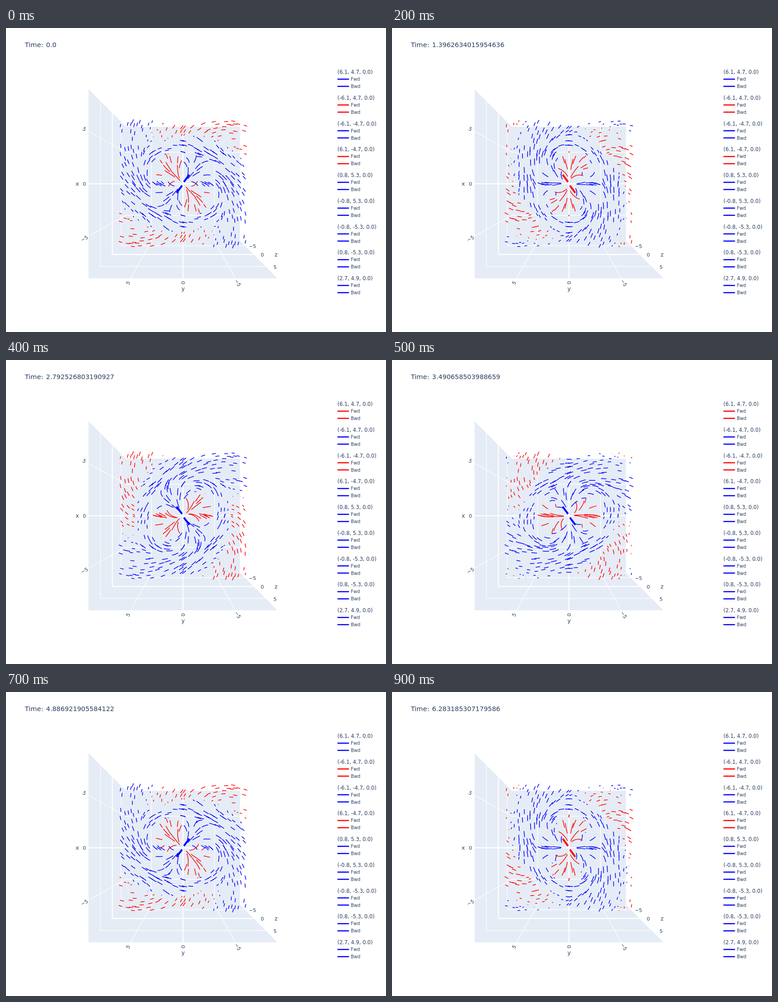
An HTML page with a canvas for the animation above (1000 ms loop, 837 by 669 pixels).

```html
<!DOCTYPE html>
<html lang="en">
<head>
<meta charset="utf-8">
<style>
  html, body { margin: 0; width: 100%; height: 100%; overflow: hidden; background: #fff; }
  canvas { display: block; }
</style>
</head>
<body>
<canvas id="stage" width="837" height="669"></canvas>
<script>
const ctx = document.getElementById('stage').getContext('2d');
const CX = 389.8, CY = 342.8, UNIT = 17.24;
const BLUE = '#0000ff', RED = '#ff0000', INK = '#2a3f5f', WALL = '#e5ecf6';
const STEPS = 10, HOLD = 100;
const WAVE = 0.6 / UNIT;                 // radial wave number per pixel
const AXIS = 133 * Math.PI / 180;        // starting direction of the inner pattern
const TURN = 25.1 * Math.PI / 180;       // rotation per step
const SIGNS = [[1, 1], [-1, 1], [-1, -1], [1, -1]];

// Seed points of one quadrant; x points up and y to the left.
const named = [[6.1, 4.7], [0.8, 5.3], [2.7, 4.9]];
const seeds = [...named];
let state = 11;
const random = () => (state = state * 16807 % 2147483647) / 2147483647;
while (seeds.length < 98) {
  const p = [random() * 8, random() * 8];
  const far = seeds.every(s => Math.hypot(s[0] - p[0], s[1] - p[1]) > 0.36);
  if (far && Math.hypot(...p) > 1.2) seeds.push(p);
}
const mirror = points => points.flatMap(([x, y]) => SIGNS.map(([sx, sy]) => [x * sx, y * sy]));
const toPixels = ([x, y]) => [-y * UNIT, x * UNIT];

// Tidal tensor of a rotating quadrupole in polar components, in pixels with y up.
function tensor(x, y, step) {
  const r = Math.max(Math.hypot(x, y), 3), u = r * WAVE, u2 = u * u, u3 = u2 * u;
  const phase = 2 * (Math.atan2(y, x) - AXIS + TURN * step) + u;
  const c = Math.cos(phase), s = Math.sin(phase), scale = u ** -5;
  const part = (p, q) => (p * c - q * s) * scale;
  const rr = part(12 * u2 - 36, 36 * u);
  const rt = part(24 * u - 4 * u3, 24 - 12 * u2);
  const tt = part(u2 * u2 - 9 * u2 + 21, 2 * u3 - 21 * u)
    + 0.8 * Math.exp(-(((r - 80) / 28) ** 2));
  return { rr, rt, tt };
}

function trace(x, y, step) {
  const t = tensor(x, y, step);
  return t.rr + t.tt;
}

function heading(x, y, step, red) {
  const t = tensor(x, y, step);
  return Math.atan2(y, x) + Math.atan2(2 * t.rt, t.rr - t.tt) / 2 + (red ? Math.PI / 2 : 0);
}

function strokeLength(size, red) {
  return size / (size + 0.15) * (15 + (red ? 18 : 5) * size / (size + 3));
}

function drawHalf(x, y, step, red, length, sign) {
  const n = 10, h = length / 2 / n;
  let last = heading(x, y, step, red) + (sign < 0 ? Math.PI : 0);
  ctx.moveTo(CX + x, CY - y);
  for (let i = 0; i < n; i++) {
    let a = heading(x, y, step, red);
    if (Math.cos(a - last) < 0) a += Math.PI;
    x += h * Math.cos(a);
    y += h * Math.sin(a);
    last = a;
    ctx.lineTo(CX + x, CY - y);
  }
}

const field = mirror(seeds).map(toPixels);

function drawField(step) {
  ctx.lineWidth = 1.5;
  for (const [x, y] of field) {
    const value = trace(x, y, step), red = value < 0;
    const length = strokeLength(Math.abs(value), red);
    ctx.strokeStyle = red ? RED : BLUE;
    ctx.beginPath();
    drawHalf(x, y, step, red, length, 1);
    drawHalf(x, y, step, red, length, -1);
    ctx.stroke();
  }
}

function line(x1, y1, x2, y2, width, color) {
  ctx.lineWidth = width;
  ctx.strokeStyle = color;
  ctx.beginPath();
  ctx.moveTo(x1, y1);
  ctx.lineTo(x2, y2);
  ctx.stroke();
}

// Heavy pair of strokes beside the centre: red then blue, on alternating diagonals.
function drawCore(step) {
  const cycle = (step + 2.1) / 3.6;
  const side = Math.floor(cycle) % 2 ? -1 : 1;
  const color = cycle % 1 < 0.33 ? RED : BLUE;
  for (const s of [1, -1]) {
    line(CX + s * side * 2, CY - s * 4, CX + s * side * 14, CY - s * 20, 4, color);
  }
}

function text(str, x, y, size, align = 'left', angle = 0) {
  ctx.save();
  ctx.translate(x, y);
  ctx.rotate(angle * Math.PI / 180);
  ctx.font = size + 'px Verdana, "DejaVu Sans", sans-serif';
  ctx.textAlign = align;
  ctx.fillStyle = INK;
  ctx.fillText(str, 0, size * 0.365);
  ctx.restore();
}
const label = (str, x, y, angle = 0, size = 11) => text(str, x, y, size, 'center', angle);

function drawBox() {
  const back = 125.5, front = 208;
  ctx.fillStyle = WALL;
  ctx.beginPath();
  for (const [x, y] of [[-front, -front], [-back, -back], [back, -back], [back, back], [front, front], [-front, front]]) {
    ctx.lineTo(CX + x, CY + y);
  }
  ctx.fill();
  for (const v of [5, 0, -5]) {
    const b = -v * 13.9, f = -v * 23.04, w = v ? 1.2 : 2.2;
    const h = 878 / (5.64 - v * 0.1625);
    const name = String(v).replace('-', '−');
    line(CX + b, CY - back, CX + b, CY + back, w, '#fff');
    line(CX - back, CY + b, CX + back, CY + b, w, '#fff');
    line(CX - back, CY + b, CX - front, CY + f, w, '#fff');
    line(CX + b, CY + back, CX + f, CY + front, w, '#fff');
    line(CX - h, CY - h, CX - h, CY + h, w, '#fff');
    line(CX - h, CY + h, CX + h, CY + h, w, '#fff');
    label(name, CX - 217, CY - v * 24.1, v * 6);
    label(name, CX - v * 24.2, CY + 218, v ? -12 * v : -90);
    label(name, CX + h + 19 + v * 0.4, CY + h + 1);
  }
  label('x', 157, 343, 0, 12);
  label('y', 390, 574, 0, 12);
  label('z', 595, 499, 0, 12);
}

function drawLegend(step) {
  mirror(named).slice(0, 9).forEach((point, i) => {
    const y = 97 + i * 56.75;
    const color = trace(...toPixels(point), step) < 0 ? RED : BLUE;
    text(`(${point.map(v => v.toFixed(1)).join(', ')}, 0.0)`, 730, y, 11.4);
    ['Fwd', 'Bwd'].forEach((name, j) => {
      const ly = y + 15.6 + j * 15.8;
      line(730, ly, 755.5, ly, 2.5, color);
      text(name, 759.5, ly, 9.9);
    });
  });
}

function draw(step) {
  ctx.fillStyle = '#fff';
  ctx.fillRect(0, 0, 837, 669);
  drawBox();
  drawField(step);
  drawCore(step);
  text('Time:', 41.5, 36.5, 14.6);
  text(step ? String(step * (2 * Math.PI / 9)) : '0.0', 88.3, 36.5, 14.3);
  drawLegend(step);
}

let shown = -1;
function tick(now) {
  const step = Math.floor(now / HOLD) % STEPS;
  if (step !== shown) draw(shown = step);
  requestAnimationFrame(tick);
}
tick(performance.now());
</script>
</body>
</html>
```
